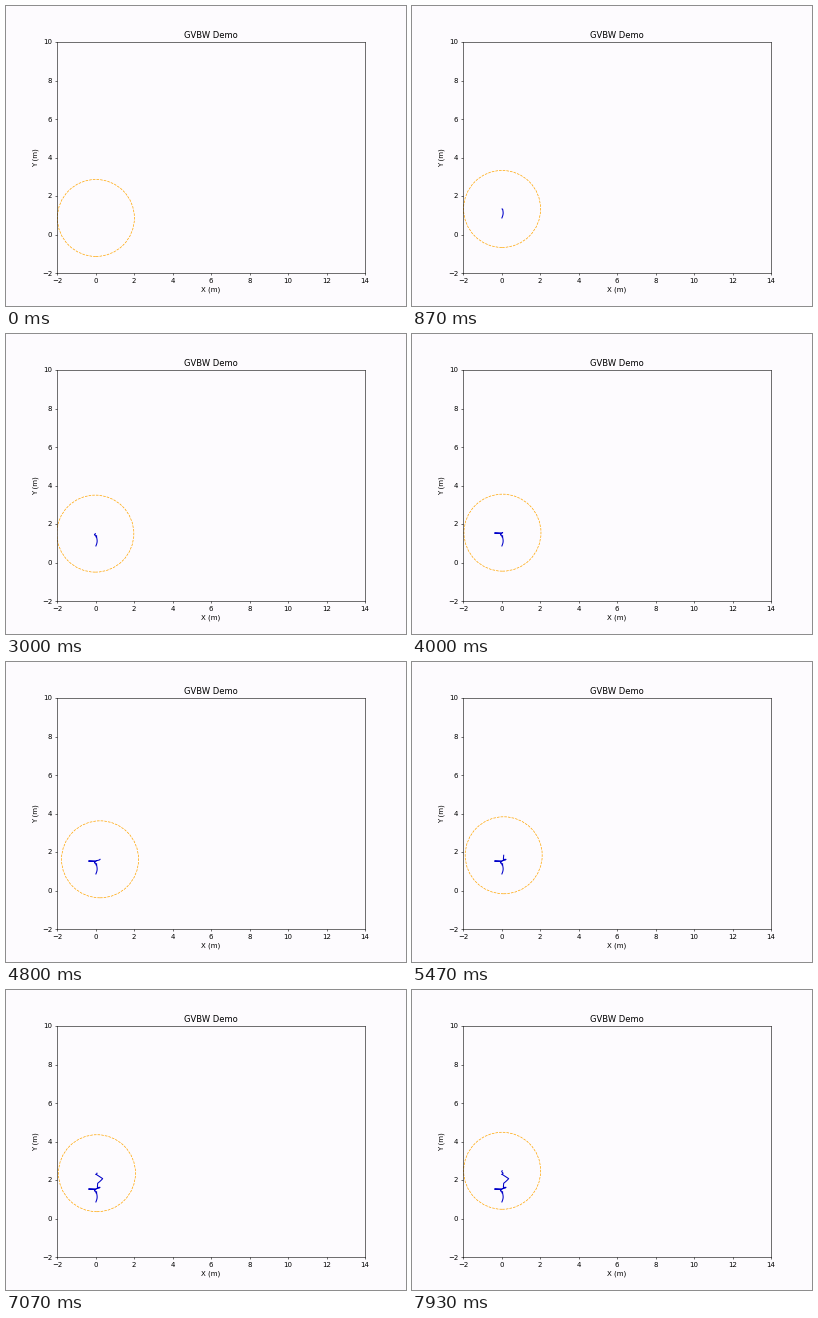
Write a matplotlib script that moves like this. It is 400 px wide and 300 px high and loops after 8000 ms.

```python
import matplotlib.pyplot as plt
import numpy as np
from matplotlib.animation import FuncAnimation
from matplotlib.patches import Circle

STEPS = 120
LOOP_MS = 8000
PAPER = "#fdfbfe"

# step, x, y of the main turns, in metres
TURNS = [
    (0, 0.02, 0.86), (11, 0.07, 1.32), (26, 0.02, 1.38), (45, -0.05, 1.50),
    (50, -0.36, 1.53), (55, 0.10, 1.54), (60, 0.05, 1.55), (72, 0.26, 1.62),
    (78, 0.12, 1.61), (82, 0.09, 1.83), (87, 0.34, 2.07), (92, 0.06, 2.29),
    (101, 0.03, 2.30), (119, 0.06, 2.49),
]


def walk(steps):
    """Straight legs between the turns with a slight sideways sway."""
    t, x, y = zip(*TURNS)
    sway = 0.04 * np.sin(np.pi * steps / 10)
    return np.interp(steps, t, x) + sway, np.interp(steps, t, y)


xs, ys = walk(np.arange(STEPS))

plt.rcParams["font.family"] = "DejaVu Sans"
fig, ax = plt.subplots(figsize=(8, 6), dpi=50, facecolor=PAPER)
ax.set(xlim=(-2, 14), ylim=(-2, 10), aspect="equal", facecolor=PAPER,
       xlabel="X (m)", ylabel="Y (m)", title="GVBW Demo")

trail, = ax.plot([], [], color="#0000c8", lw=1.5)
reach = Circle((xs[0], ys[0]), 2, fill=False, ec="orange", ls="--", lw=1)
ax.add_patch(reach)


def draw(step):
    trail.set_data(xs[:step + 1], ys[:step + 1])
    reach.center = xs[step], ys[step]
    return trail, reach


anim = FuncAnimation(fig, draw, frames=STEPS, interval=LOOP_MS / STEPS,
                     repeat=True, repeat_delay=0)
plt.show()
```
